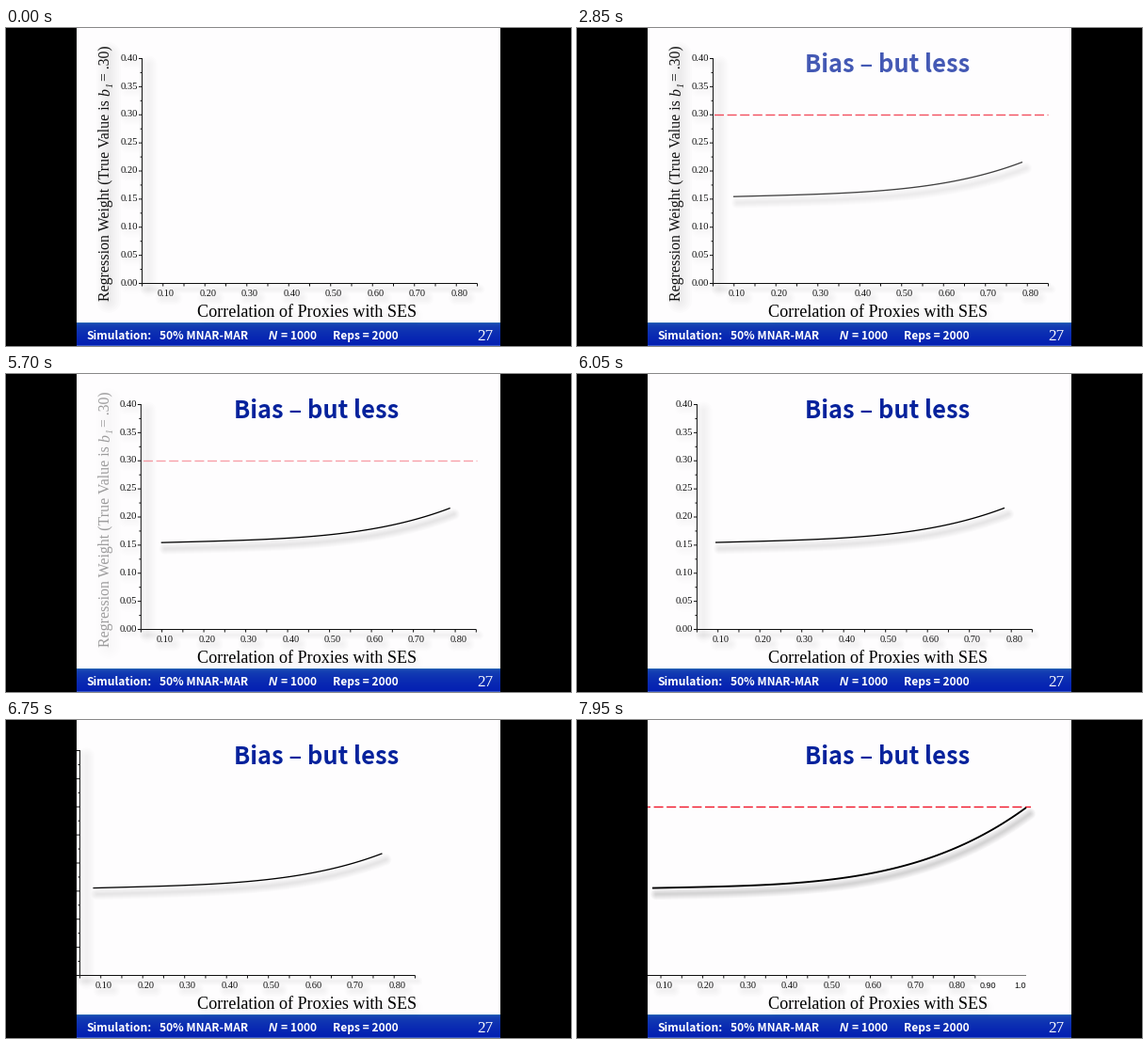
A matplotlib script that plays this animation: 600 by 338 pixels, repeating every 8 s.

```python
import numpy as np
import matplotlib.pyplot as plt
from matplotlib.animation import FuncAnimation
from matplotlib.patches import Rectangle
from matplotlib.transforms import Affine2D

W, H, DPI, STEP, LOOP = 600, 338, 100, 50, 8000
PX = 72 / DPI
SERIF, SANS, UI = "Liberation Serif", "Liberation Sans", "Noto Sans CJK JP"
BLUE, RED, INK = "#06229c", "#f01428", "#101010"
X0, X1, Y0, Y1 = 144.5, 500.5, 271.5, 32.5
CELL = (X1 - X0) / 8

fig = plt.figure(figsize=(W / DPI, H / DPI), dpi=DPI, facecolor="#fefdfe")
ax = fig.add_axes([0, 0, 1, 1])
ax.axis("off")


class Group:
    """Artists that move and fade together."""

    def __init__(self, z=2):
        self.shift = Affine2D()
        self.trans = self.shift + ax.transData
        self.items = []
        self.z = z

    def add(self, artist, alpha=1.0):
        artist.set_alpha(alpha)
        self.items.append((artist, alpha))

    def line(self, x, y, lw=1.0, color=INK, alpha=1.0, z=0, **kw):
        kw.setdefault("solid_capstyle", "butt")
        art, = ax.plot(x, y, lw=lw * PX, color=color, transform=self.trans,
                       zorder=self.z + z, snap=False, **kw)
        self.add(art, alpha)

    def text(self, x, y, s, size, color=INK, font=SERIF, **kw):
        kw.setdefault("va", "baseline")
        self.add(ax.text(x, y, s, fontsize=size * PX, color=color, family=font,
                         transform=self.trans, zorder=self.z, **kw))

    def shadow(self, x, y, width, strength=0.1, dx=3, dy=6):
        n = 6
        for k in range(1, n + 1):
            self.line(np.add(x, dx), np.add(y, dy), width * k / n, "black",
                      strength / n, z=-1, solid_capstyle="round",
                      solid_joinstyle="round")

    def place(self, dx, dy=0):
        self.shift.clear().translate(dx, dy)

    def fade(self, a):
        for art, base in self.items:
            art.set_alpha(base * a)
            art.set_visible(a > 0)


def ramp(t, start, length):
    return float(np.clip((t - start) / length, 0, 1))


def smooth(u):
    return u * u * (3 - 2 * u)


def strokes(at, lo, hi):
    """Positions and spans of parallel ticks, as one broken line."""
    return np.repeat(at, 3), np.tile([lo, hi, np.nan], len(at))


def x_axis(g):
    g.shadow([X0, X1], [Y0, Y0], 10, 0.05)
    g.line([X0, X1], [Y0, Y0])
    x, y = strokes(X0 + CELL / 2 * np.arange(17), Y0, Y0 + 3)
    g.line(x, y)
    for i in range(8):
        x = 170 + CELL * i
        g.shadow([x - 7, x + 7], [282, 282], 15, 0.04, 3, 5)
        g.text(x, 284.8, f"{0.1 * (i + 1):.2f}", 10.4, ha="center")


def y_axis(g):
    g.shadow([X0, X0], [Y0, Y1], 18, 0.04, 7)
    g.line([X0, X0], [Y0, Y1 - 0.5])
    major = np.linspace(Y1, Y0, 9)
    minor = (major[1:] + major[:-1]) / 2
    for at, size in ((major, 3.5), (minor, 2)):
        y, x = strokes(at, X0 - size, X0)
        g.line(x, y)
    for i, y in enumerate(major):
        g.shadow([125, 137], [y, y], 14, 0.03, 3, 4)
        g.text(140.2, y + 2.2, f"{0.40 - 0.05 * i:.2f}", 10.6, ha="right")


def curve(g, xa, xb, ya, slope, rise, power, lw, shade):
    u = np.linspace(0, 1, 80)
    x, y = xa + (xb - xa) * u, ya - slope * u - rise * u ** power
    g.shadow(x, y, 12, shade, 4, 6.5)
    g.line(x, y, lw, "black")


def dashes(g, xa, xb):
    g.line([xa, xb], [92.5, 92.5], 1.4, RED, dashes=(10 / 1.4, 3.6 / 1.4),
           dash_capstyle="butt")


# slide frame
shade = np.linspace(0, 1, 25)[:, None, None] ** 0.3
bar = (1 - shade) * np.array([40, 100, 180]) + shade * np.array([4, 32, 178])
bar[-1] = [60, 90, 200]
ax.imshow(bar / 255, extent=(75, 525, H, 313), aspect="auto", zorder=8,
          interpolation="nearest")
for x in (-1, 525):
    ax.add_patch(Rectangle((x, -1), 76, H + 2, fc="black", lw=0, zorder=20))

fixed = Group(9)
for x, s in ((85, "Simulation:"), (163, "50% MNAR-MAR"),
             (292, "= 1000"), (347, "Reps = 2000")):
    fixed.text(x, 331, s, 12, "white", UI, weight="bold")
fixed.text(279, 331, "N", 12.5, "white", SANS, weight="bold", style="italic")
fixed.text(500, 332.5, "27", 17, "white")
fixed.shadow([210, 430], [301, 301], 20, 0.03, 3, 5)
fixed.text(203, 307, "Correlation of Proxies with SES", 18.1, "black")

# vertical axis title
label = Group()
label.shadow([104, 104], [286, 24], 26, 0.06, 5, 4)
up = dict(rotation=90, rotation_mode="anchor", ha="left")
label.text(110, 290, "Regression Weight (True Value is", 15.9, **up)
label.text(110, 72, "b", 15.9, style="italic", **up)
label.text(114, 63, "1", 10, style="italic", **up)
label.text(110, 56, "= .30)", 15.6, **up)

# first chart
xs, ys = Group(), Group()
x_axis(xs)
y_axis(ys)
short, rule, title = Group(4), Group(3), Group(5)
curve(short, 166, 473, 179.2, 8, 28.7, 3.8, 1.3, 0.09)
dashes(rule, 146, X1)
title.text(242, 47, "Bias \u2013 but less", 25.4, BLUE, UI, weight="bold")

# extended chart
wide = Group(4)
wide_x = Group()
x_axis(wide_x)
wide.line([X1 - 78, 477], [Y0, Y0], 0.8, "#555555")
wide.text(436, 284.8, "0.90", 9, font=SANS, ha="center")
wide.text(471, 284.8, "1.0", 9, font=SANS, ha="center")
dashes(wide, 68, 482)
curve(wide, 80, 477, 178.6, 8, 77.5, 3.65, 1.9, 0.16)
wide_x.place(-77.7)

ax.set_xlim(0, W)
ax.set_ylim(H, 0)


def draw(i):
    t = i * STEP
    enter = ramp(t, 2475, 500)
    leave = 1 - ramp(t, 5400, 500)
    move = smooth(ramp(t, 5590, 1500))
    swap = ramp(t, 7100, 850)

    xs.place(-76 * move)
    ys.place(-76 * move)
    short.place(-84.6 * move, -0.7 * move)

    title.fade(enter)
    rule.fade(enter * leave)
    label.fade(leave)
    xs.fade(1 - swap)
    ys.fade(1 - swap)
    short.fade(enter * (1 - swap))
    wide.fade(swap)
    wide_x.fade(swap)
    return []


anim = FuncAnimation(fig, draw, frames=LOOP // STEP, interval=STEP,
                     repeat=True, repeat_delay=0, blit=False)
plt.show()
```
